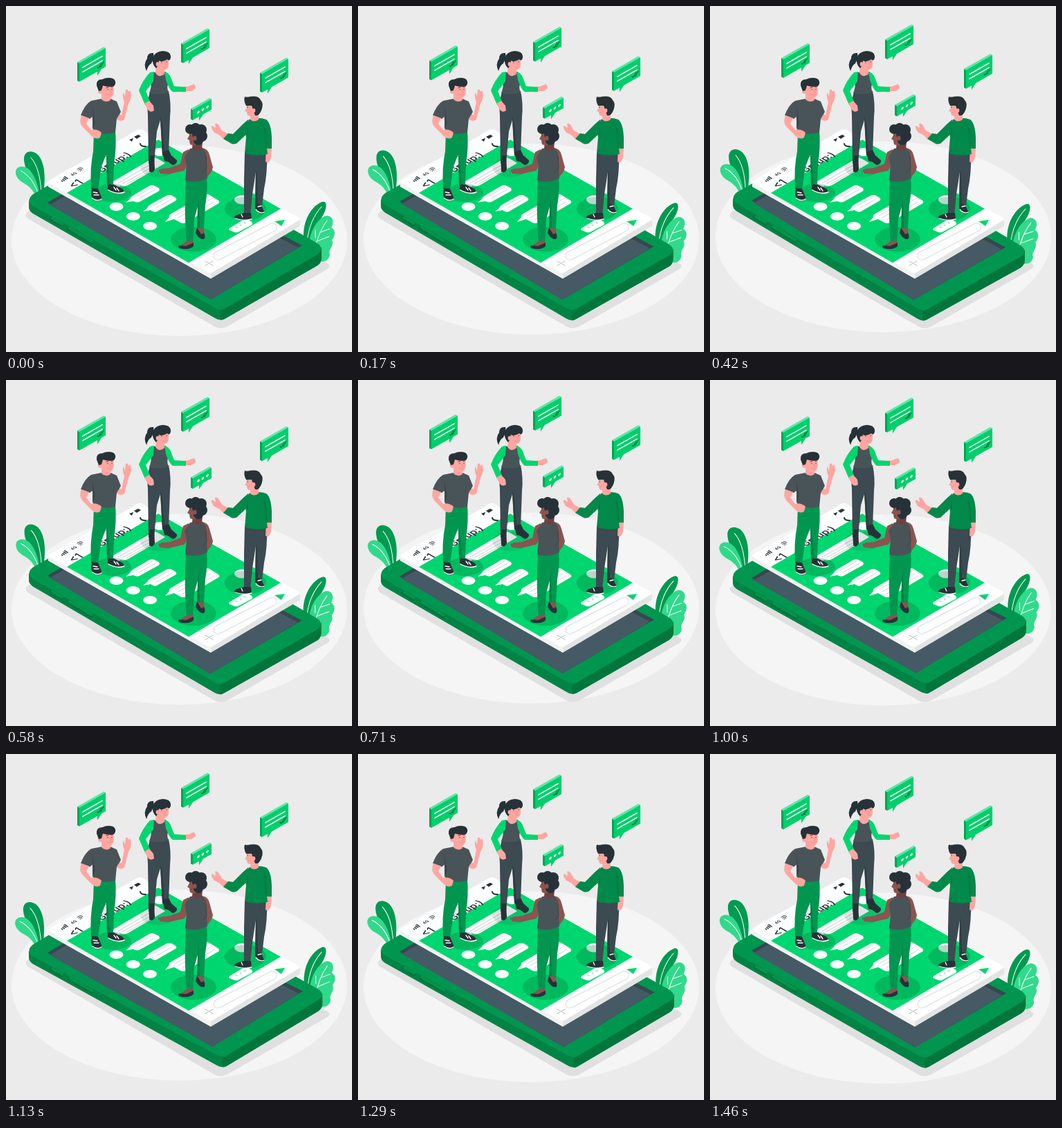
An HTML page with a canvas that plays this animation: 500x500 px, repeating every 1.5 s.

```html
<!DOCTYPE html>
<html lang="en">
<head>
<meta charset="utf-8">
<title>Group chat</title>
<style>
html, body { margin: 0; height: 100%; overflow: hidden; background: #ebebeb; }
canvas { display: block; width: 100vw; height: 100vh; }
</style>
</head>
<body>
<canvas id="stage"></canvas>
<script>
const canvas = document.getElementById('stage');
const ctx = canvas.getContext('2d');
const scale = Math.max(1, window.devicePixelRatio || 1);
canvas.width = canvas.height = 500 * scale;

const LOOP = 1500, STEPS = 36;
const C = {
  floor: '#f5f5f5', shadow: '#e0e0e0', white: '#fff',
  bright: '#00d66f', mint: '#31d98b', leaf: '#009a50', green: '#009650',
  wall: '#008344', wallDark: '#00763c', screen: '#455a64', ink: '#263238',
  grey: '#495459', slacks: '#3c4a51', pink: '#ffa6a1', pinkDark: '#ec8883',
  brown: '#8b5450', brownDark: '#70403e', line: '#d3d6d6'
};

function fill(color, path) {
  ctx.fillStyle = color;
  ctx.fill(new Path2D(path));
}
function line(color, width, path) {
  ctx.strokeStyle = color;
  ctx.lineWidth = width;
  ctx.stroke(new Path2D(path));
}
function oval(color, x, y, rx, ry = rx, turn = 0) {
  ctx.fillStyle = color;
  ctx.beginPath();
  ctx.ellipse(x, y, rx, ry, turn, 0, Math.PI * 2);
  ctx.fill();
}
function sheetText(text, x, y, size, weight = 400) {
  ctx.save();
  ctx.transform(0.866, -0.5, 0.866, 0.5, x, y);
  ctx.font = `${weight} ${size}px Inter, sans-serif`;
  ctx.fillStyle = C.ink;
  ctx.fillText(text, 0, 0);
  ctx.restore();
}

function plants() {
  fill(C.leaf, 'M48 278C46 260 26 240 26 221C26 210 36 207 45 214C57 225 58 252 53 275Z');
  line(C.white, 1, 'M36 219C45 229 50 248 51 270');
  fill(C.mint, 'M45 278C39 266 35 261 24 255C11 247 11 233 22 232C36 231 45 250 49 275Z');
  line(C.white, 1, 'M21 238C33 244 43 257 47 274');

  fill(C.leaf, 'M431 342C426 315 440 289 457 283C466 281 463 296 456 306C447 317 441 328 440 347Z');
  line(C.white, 1, 'M456 290C445 302 437 319 435 342');
  fill(C.mint, 'M438 350C437 329 449 307 463 303C474 303 474 315 470 320C477 324 476 332 471 338C475 347 465 351 468 359C467 368 459 371 452 368Z');
  line(C.white, 1, 'M464 310C455 322 449 337 445 357M454 327L468 322M449 340L467 333M447 335L447 324');
}

function phone() {
  fill(C.wall, 'M33 281L33 291Q33 296 39 300L302 451Q310 456 318 451L450 375Q456 371 456 364L456 349L310 430Z');
  fill(C.wallDark, 'M310 441V454Q314 454 318 451L450 375Q456 371 456 364V350Z');
  fill(C.green, 'M39 289Q28 281 39 272L174 194Q182 190 190 194L450 343Q461 351 450 359L318 436Q310 441 302 436Z');
  fill('#37474f', 'M60 284L178 216L428 346L296 424Z');
  fill(C.screen, 'M62 288L180 221L422 349L296 424L61 286Z');
  line(C.wallDark, 7, 'M66 308L80 316M91 322L123 341');
  line('#00954c', 4, 'M67 307L81 315M92 321L124 340');
}

function status() {
  [0, 1, 2, 3].forEach(i => line(C.ink, 1.4, `M${82 + i * 2.4} ${253.5 - i * 1.4}l${-1.5 - i} ${-0.9 - i * 0.6}`));
  sheetText('4G', 96, 246, 6, 600);
  line(C.ink, 1, 'M103 236Q107 232 111 235M105 237Q108 235 110 237M107 239L108 238');
  sheetText('9:15', 137, 222, 7, 600);
  fill(C.ink, 'M178 193L184 191L182 196Z');
  fill(C.ink, 'M185 189L191 186L195 188L189 192Z');
  line(C.ink, 2, 'M194 199Q194 203 202 203');
  sheetText('<1', 98, 264, 16, 500);
  sheetText('Group:)', 138, 241, 14, 600);
}

function messages() {
  fill(C.white, 'M149 257L212 220Q216 218 220 221L230 227L176 259Q170 262 165 260L160 264Z');
  line(C.line, 1.2, 'M162 256L207 230M168 257L211 233M175 257L216 234');
  oval(C.white, 222, 211, 9, 6);
  [0, 1, 2].forEach(i => oval(C.white, 159.5 + i * 24.3, 290 + i * 14, 10, 6));

  fill(C.white, 'M173 284L179 279Q181 275 185 273L207 260Q211 258 215 260L221 263Q223 266 220 268L193 283Q189 285 184 282Z');
  fill(C.white, 'M198 297L204 292Q206 288 210 286L232 274Q236 272 240 274L245 277Q248 280 244 282L218 297Q214 299 209 295Z');
  line(C.line, 1, 'M187 276L212 262M192 278L216 265M212 289L236 276M217 292L240 279');
  fill(C.white, 'M230 312L236 305Q235 302 239 300L286 273Q290 271 294 273L307 281Q310 284 306 286L260 313Q256 315 252 313L243 308Z');
  line(C.line, 1, 'M244 303L290 277M249 306L296 279M255 309L301 283');
  oval(C.white, 341, 280, 11, 6.5);
  fill(C.white, 'M323 321L343 309Q347 307 351 309L355 312Q358 315 354 317L335 327Q331 328 328 326L323 324Q321 323 323 321Z');
  [0, 1, 2].forEach(i => oval('#a6e9c9', 333 + i * 6, 320 - i * 3.4, 1.7, 1.2));
}

function sheet() {
  fill('#e3e5e5', 'M61 254V261L296 394L425 318V307L296 383Z');
  fill('#f1f2f2', 'M61 254V261L296 394V384Z');
  fill(C.white, 'M63 256Q60 254 63 252L190 179Q193 177 197 179L423 306Q427 308 423 310L300 384Q296 387 292 385Z');
  fill(C.bright, 'M88 270L220 193L397 293L264 371Z');
  messages();
  status();

  line('#cfd4d4', 13, 'M306 361L385 320');
  line(C.white, 11.4, 'M306 361L385 320');
  line('#c4c8c8', 1.2, 'M288 369L299 375M288 375L299 369');
  fill(C.bright, 'M388 311L403 309L398 318Z');

  const shade = 'rgba(0,110,55,.28)';
  oval(shade, 154, 270, 27, 13);
  oval('rgba(60,90,80,.16)', 220, 233, 26, 14);
  oval(shade, 271, 337, 33, 18);
  oval(shade, 346, 293, 30, 17);
}

function wavingMan() {
  fill(C.pink, 'M160 153L167 158L171 139Q167 128 170 125L172 131L173 121Q176 119 177 124L179 122Q182 126 180 135L177 141L171 164Q166 169 158 162Z');
  fill(C.green, 'M127 181L158 180Q160 205 156 229L155 259L146 259L145 214L138 232L133 265L123 264Q121 234 126 210Z');
  fill('#007e41', 'M145 211L146 259L150 259L147 220Z');
  fill(C.ink, 'M124 263L133 264L138 276Q139 282 132 282L126 280L123 273Z');
  line(C.white, 1.4, 'M125 278Q132 283 138 279M126 269L132 270M127 273L134 273');
  fill(C.ink, 'M147 258L156 258L168 264Q173 268 168 271L160 271L147 265Z');
  line(C.white, 1.4, 'M148 266Q161 273 171 269M156 262L159 266M160 263L163 267');
  fill(C.grey, 'M123 137L138 134H151L160 138L166 153L160 163L158 183Q142 187 126 182L125 160L121 163L108 158Q114 142 123 137Z');
  fill('#3c484e', 'M125 144L129 169L125 178L125 160Z');
  fill(C.pink, 'M109 158L120 162L116 170L123 179Q132 177 138 183L136 190Q130 194 124 188L110 174Q105 167 109 158Z');
  fill(C.pink, 'M138 125H151V136Q144 141 138 135Z');
  fill(C.pink, 'M136 112L155 111L156 124Q154 135 146 133L137 126Z');
  oval(C.pink, 136, 123, 3, 4);
  fill(C.ink, 'M134 123L131 115Q130 106 139 106Q147 102 155 105Q161 109 156 116Q149 118 140 115L138 122Z');
  line(C.ink, 0.8, 'M145 118L148 117M152 117L154 117M147 120V121M153 120V121');
  line(C.pinkDark, 0.8, 'M150 121L152 125L150 125M147 128Q150 130 153 127');
}

function ponytailWoman() {
  fill(C.ink, 'M213 68Q204 67 204 76Q198 84 203 94Q205 86 210 83L214 75Z');
  fill(C.pink, 'M256 117L264 116L271 113Q275 115 274 119L268 123L257 123Z');
  fill(C.slacks, 'M208 124L235 123Q239 141 237 160L235 213L226 216L223 165L218 181L214 228L206 227L205 158Q203 140 208 124Z');
  fill('#303c42', 'M223 160L226 216L229 214L226 170Z');
  fill(C.ink, 'M206 216H214L215 236Q212 243 207 239Z');
  fill(C.ink, 'M226 211L235 208L239 216L247 223Q248 228 241 230L234 225L229 224Z');
  fill(C.grey, 'M211 96L231 95L236 108Q231 117 235 125Q220 129 207 126Q211 116 209 108Z');
  fill(C.bright, 'M214 95L208 96Q197 108 192 122L201 143L208 138L202 123L213 109Z');
  fill(C.bright, 'M229 95Q235 96 238 103L243 116L260 117V124L241 124Q236 121 231 107Z');
  fill(C.pink, 'M200 141L207 137L213 144L214 151Q209 155 205 150Z');
  fill(C.pink, 'M217 87H229L229 98Q222 105 216 97Z');
  fill(C.pink, 'M218 76L235 74L235 86Q234 93 227 92L218 86Z');
  fill(C.ink, 'M217 90Q211 85 212 75Q215 66 226 65Q239 65 238 75Q236 81 233 77Q226 82 221 79L219 87Z');
  oval(C.pink, 219, 84, 2.4, 3);
  line(C.ink, 0.8, 'M225 81V82M232 80V81M224 79L227 78');
  line(C.pinkDark, 0.9, 'M229 82L231 85M227 88Q230 90 232 87');
}

function sweaterMan() {
  fill(C.slacks, 'M345 211L377 212Q378 242 373 264L370 289L360 289L361 240L356 272L353 302L344 300L344 252Z');
  fill('#303c42', 'M361 236L360 289L364 289L363 245Z');
  fill(C.ink, 'M344 299L354 299L355 308L345 310L331 308Q328 305 333 302Z');
  line(C.white, 1.3, 'M331 307Q344 311 355 308M340 301L342 305');
  fill(C.ink, 'M360 285L369 288L373 297Q373 301 367 300L360 294Z');
  line(C.white, 1.3, 'M361 294Q367 301 373 298M364 290L369 289');
  fill(C.pink, 'M321 185L315 193L309 187L300 182Q295 174 298 173L303 176L302 170Q305 168 308 173L312 180Z');
  fill(C.pink, 'M376 204L384 204L383 219Q380 229 375 225Z');
  fill('#00894a', 'M350 164L342 171L328 185L321 184L314 192L326 199Q332 201 336 196L349 184Z');
  fill('#00894a', 'M351 164Q366 160 376 164Q383 169 384 190L384 206L376 206L375 188L378 214Q362 218 345 213L347 190L345 177Z');
  line('#006f39', 1, 'M374 176L375 190L376 204M349 176L349 187M347 211L350 207');
  fill(C.pink, 'M354 153H365V164Q358 169 353 164Z');
  fill(C.pink, 'M348 140L363 140L363 155Q358 162 349 158L348 153L345 152L348 147Z');
  fill(C.ink, 'M347 144Q343 137 345 131Q349 132 352 131Q365 129 368 136Q373 141 369 151Q365 160 360 158L357 150L355 144Z');
  oval(C.pink, 358, 151, 2.4, 3);
  line(C.ink, 0.8, 'M349 146V147M348 144L351 143');
  line(C.pinkDark, 0.8, 'M349 155L352 154');
}

function vestPerson() {
  fill(C.brown, 'M264 207L256 211L252 228L237 234L226 235L220 237L223 242L235 243L257 238Q262 234 266 218Z');
  fill(C.green, 'M260 250L290 247Q292 266 288 288L286 324L276 324L277 290L272 308L270 343L261 342Q257 300 260 250Z');
  fill('#007e41', 'M278 274L276 324L280 324L279 290Z');
  fill(C.brown, 'M262 339L270 339L271 346L260 350L250 348Z');
  fill(C.ink, 'M250 346L260 347L271 342V347Q267 352 255 351Q247 350 250 346Z');
  fill(C.brown, 'M276 320L286 322L287 333L279 333Z');
  fill(C.ink, 'M276 320L282 330L286 328Q289 333 286 337Q280 338 274 328Z');
  fill(C.brown, 'M283 205Q292 206 294 215L299 233Q298 240 288 250L282 247L290 234L286 220Z');
  fill(C.grey, 'M266 206L283 204L289 212L291 249Q276 257 259 252L261 231L258 218Z');
  line('#37434a', 0.9, 'M289 217L290 233L285 240');
  fill(C.brownDark, 'M270 196H284L283 207Q275 211 269 206Z');
  fill(C.brown, 'M264 180L279 180V196Q275 204 266 200L265 194L262 192L265 187Z');
  [[266, 178, 7], [274, 176, 7], [282, 179, 8], [283, 188, 8], [278, 194, 7], [277, 185, 8]]
    .forEach(([x, y, r]) => oval(C.ink, x, y, r));
  oval(C.brown, 273, 191, 2.6, 3.5);
  line(C.ink, 0.8, 'M266 187V188');
  line(C.brownDark, 0.9, 'M266 197L269 196');
}

// Origin: upper left corner of the front face, which rises to the right.
function bubble(x, y, w, h, tailX, content) {
  const rise = w * 0.57;
  ctx.save();
  ctx.translate(x, y);
  fill('#00a455', `M0 0L-3 -1.6V${h - 1.6}L0 ${h}Z`);
  fill('#5ae8a5', `M0 0L-3 -1.6L${w - 3} ${-rise - 1.6}L${w} ${-rise}Z`);
  ctx.transform(1, -0.57, 0, 1, 0, 0);
  fill('#00cf6b', `M0 0H${w}V${h}H${tailX + 6}L${tailX} ${h + 6}V${h}H0Z`);
  content();
  ctx.restore();
}
function messageText() {
  line(C.white, 1.7, 'M5 9H33M5 15.5H33');
  line('#06532f', 1, 'M26 21L28 23L32 18M30 22L31 23L35 18');
}
function typingDots() {
  [8, 14.5, 21].forEach(x => oval(C.white, x, 8, 1.8));
}
function bubbles() {
  bubble(106, 82.5, 38, 27, 26, messageText);
  bubble(256, 55.5, 38, 27, 8, messageText);
  bubble(370, 98, 38, 27, 8, messageText);
  bubble(270, 150, 27, 15, 9, typingDots);
}

function draw(now) {
  const step = Math.floor((now % LOOP) / LOOP * STEPS + 0.1) % STEPS;
  const phase = step / STEPS;
  const lift = -10 * (1 - Math.abs(1 - 2 * phase));
  const sway = Math.abs(((phase + 0.75) % 1) * 4 - 2) - 1;

  ctx.setTransform(scale, 0, 0, scale, 0, 0);
  ctx.lineCap = ctx.lineJoin = 'round';
  ctx.fillStyle = '#ebebeb';
  ctx.fillRect(0, 0, 500, 500);
  oval(C.floor, 250.5, 339 + lift, 242.5, 138);
  fill(C.shadow, 'M34 296Q24 302 33 308L301 463Q310 468 320 463L463 381Q472 376 463 371L300 290Z');

  ctx.save();
  ctx.translate(246, 290);
  ctx.rotate(sway * Math.PI / 180);
  ctx.translate(-246, -290);
  plants();
  phone();
  ctx.restore();

  sheet();
  ponytailWoman();
  wavingMan();
  sweaterMan();
  vestPerson();

  ctx.save();
  ctx.translate(0, lift);
  bubbles();
  ctx.restore();
}

const start = performance.now();
function tick() {
  draw(performance.now() - start);
  requestAnimationFrame(tick);
}
tick();
</script>
</body>
</html>
```
